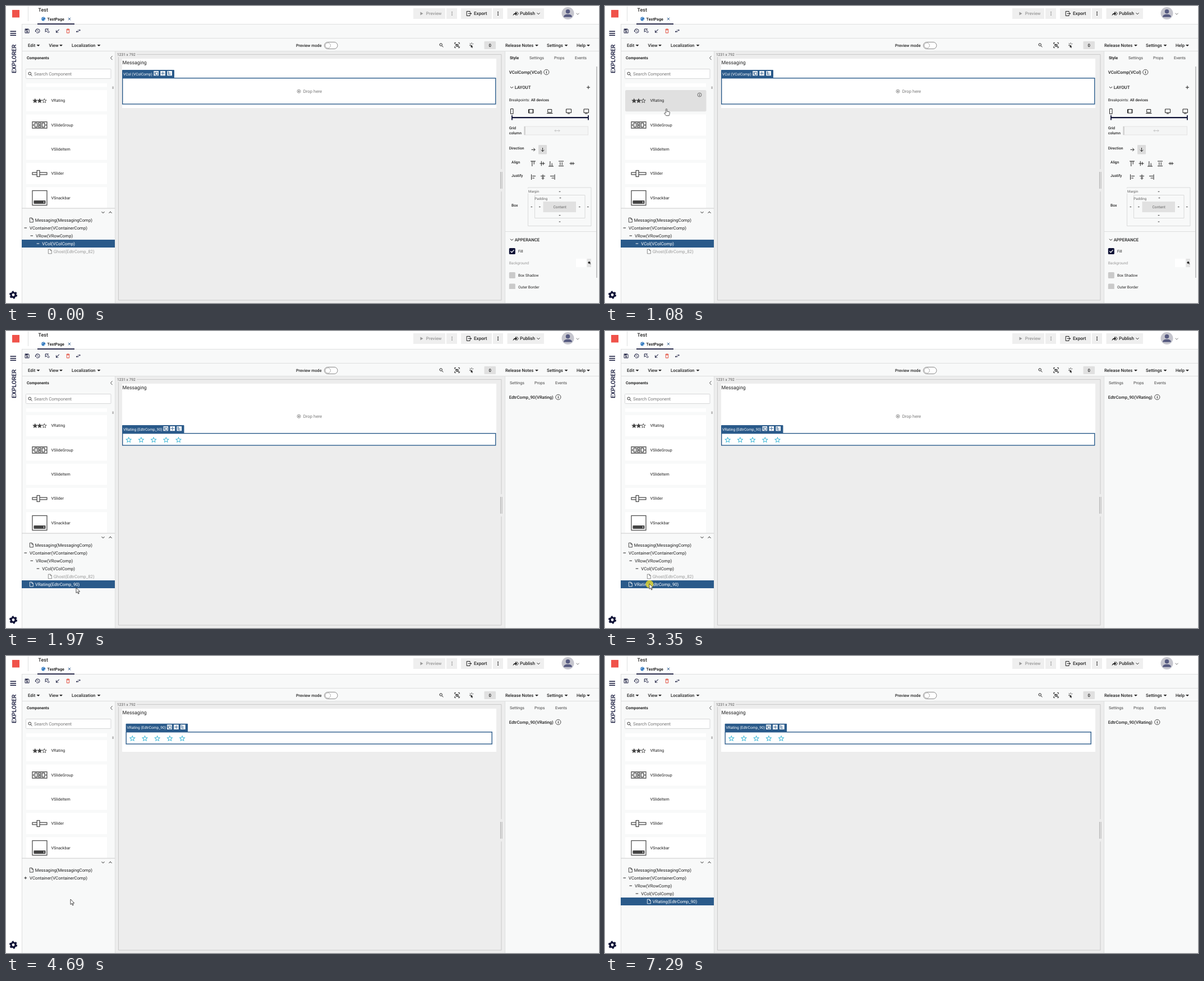
Write an HTML page that moves like this. It is 1057 px wide and 530 px high and loops after 7770 ms.

```html
<!DOCTYPE html>
<html lang="en">
<head>
<meta charset="utf-8">
<title>Page builder</title>
<style>
html, body { margin: 0; width: 100%; height: 100%; overflow: hidden; background: #fff; }
svg { display: block; width: 1057px; height: 530px; font: 7.79px Roboto, sans-serif; fill: #222; text-rendering: geometricPrecision; }
.m { font-weight: 500; }
.b { font-weight: 700; }
.s { font-size: 6.67px; }
.i { font-size: 7.1px; }
.l { fill: none; stroke: #222; }
.navy { fill: #0e1135; }
.sel { fill: #2a5a8a; }
.frame { fill: none; stroke: #2a5a8a; stroke-width: 1.4; }
.w { fill: #fff; }
.w .l { stroke: #fff; }
.btn { fill: #efefef; }
.dim { fill: #999; }
.dim .l { stroke: #aaa; }
.edge { stroke: #dedfdf; fill: none; }

.t { opacity: 0; animation: 7770ms step-end infinite; }
.before { animation-name: before; }
.after { animation-name: after; }
.loose { animation-name: loose; }
.empty { animation-name: empty; }
.nested { animation-name: nested; }
.shut { animation-name: shut; }
.open { animation-name: open; }
.rows { animation-name: rows; }
.card1 { animation-name: card1; }
.card2 { animation-name: card2; }
.over { animation-name: over; }
.press { animation-name: press; }
.arrow { animation-name: arrow; }
.hand { animation-name: hand; }
.dragged { animation-name: dragged; }
@keyframes before { 0% { opacity: 1 } 18.3% { opacity: 0 } }
@keyframes after { 18.3% { opacity: 1 } }
@keyframes loose { 18.3% { opacity: 1 } 60.3% { opacity: 0 } }
@keyframes empty { 0% { opacity: 1 } 60.3% { opacity: 0 } }
@keyframes nested { 60.3% { opacity: 1 } }
@keyframes shut { 60.3% { opacity: 1 } 63.3% { opacity: 0 } }
@keyframes open { 63.3% { opacity: 1 } }
@keyframes rows { 0% { opacity: 1 } 60.3% { opacity: 0 } 63.3% { opacity: 1 } }
@keyframes card1 { 13.85% { opacity: 1 } 20.9% { opacity: 0 } }
@keyframes card2 { 11.2% { opacity: 1 } 13.85% { opacity: 0 } }
@keyframes over { 23.8% { opacity: 1 } 24.4% { opacity: 0 } 48% { opacity: 1 } 59.4% { opacity: 0 } }
@keyframes press { 14.8% { opacity: .8 } 16.6% { opacity: 0 } 43.05% { opacity: .8 } 59.4% { opacity: 0 } }
@keyframes arrow { 0% { opacity: 1 } 11.2% { opacity: 0 } 22.6% { opacity: 1 } }
@keyframes hand { 11.2% { opacity: 1 } 22.6% { opacity: 0 } }
@keyframes dragged { 44% { opacity: .55 } 59.4% { opacity: 0 } }

.pointer { animation: pointer 7770ms ease-in-out infinite; }
@keyframes pointer {
  0%, 3.59% { transform: translate(1100px, 560px) }
  3.6% { transform: translate(899px, 512px) }
  13%, 16.6% { transform: translate(109.5px, 184px) }
  20% { transform: translate(103px, 209px); animation-timing-function: linear }
  23.8% { transform: translate(126px, 433px); animation-timing-function: ease-out }
  25.3% { transform: translate(125px, 458px) }
  33.5%, 34.5% { transform: translate(85px, 453px) }
  38.8%, 43.2% { transform: translate(79px, 451px) }
  50.9%, 69.1% { transform: translate(115px, 434px) }
  76.3%, 79.1% { transform: translate(317px, 441px) }
  82.3%, 84.9% { transform: translate(317px, 442px) }
  93.7% { transform: translate(1060px, 532px) }
  100% { transform: translate(1100px, 560px) }
}
.haul { animation: haul 7770ms ease-in-out infinite; }
@keyframes haul {
  0%, 43.2% { transform: none }
  50.9%, 100% { transform: translate(36px, -17px) }
}
</style>
</head>
<body>
<svg viewBox="0 0 1057 530">
<defs>
  <path id="caret" d="M-3-1.4h6l-3 3z"/>
  <path id="down" class="l" d="M-2.5-1.3 0 1.3l2.5-2.6"/>
  <path id="star" transform="translate(-12 -11.7)" d="M12 17.27 18.18 21l-1.64-7.03L22 9.24l-7.19-.62L12 2 9.19 8.62 2 9.24l5.45 4.73L5.82 21z"/>
  <path id="hollow" transform="translate(-12 -11.7)" fill-rule="evenodd" d="M12 15.39 8.24 17.66l.99-4.28-3.32-2.88 4.38-.37L12 6.09l1.71 4.04 4.38.37-3.32 2.88.99 4.28zM22 9.24l-7.19-.61L12 2 9.19 8.63 2 9.24l5.45 4.73L5.82 21 12 17.27 18.18 21l-1.64-7.03z"/>
  <path id="page" class="l" stroke-width=".8" d="M.4-3.9h3.8L6.4-1.7v5.6h-6zM4-3.9v2.4h2.4"/>
  <path id="dots" d="M-.8-3.4h1.6v1.6H-.8zM-.8-.8h1.6V.8H-.8zM-.8 1.8h1.6v1.6H-.8z"/>
  <g id="info"><circle class="l" r="4.6" stroke-width=".8"/><path d="M-.5-2.6h1v1h-1zM-.5-.9h1v3.5h-1z"/></g>
  <g id="tools">
    <path class="w" d="M-37 2.6h8.6v8.4H-37zM-25 2.6h8.6v8.4H-25zM-13 2.6h8.6v8.4H-13z"/>
    <path class="l" style="stroke:#2a5a8a" stroke-width=".9" d="M-35.4 4v4.5h1M-33.8 4.8h3.6v5h-3.6zM-24 6.8h6.6M-20.7 3.6v6.4M-11.7 4.2h2M-10.8 4.2v5h4M-10.8 6.6h4"/>
  </g>
  <g id="rating">
    <rect class="sel" x="207" y="168" width="110.5" height="14.5" rx="1"/>
    <text class="w s" x="209" y="177.6">VRating (EdtrComp_90)</text>
    <use href="#tools" x="317.5" y="167.3"/>
    <g fill="#2cb1d3">
      <use href="#hollow" transform="translate(218.7 194.2) scale(.556)"/>
      <use href="#hollow" transform="translate(240.9 194.2) scale(.556)"/>
      <use href="#hollow" transform="translate(263.1 194.2) scale(.556)"/>
      <use href="#hollow" transform="translate(285.3 194.2) scale(.556)"/>
      <use href="#hollow" transform="translate(307.5 194.2) scale(.556)"/>
    </g>
  </g>
  <g id="tabs" class="i" fill="#444"><text x="933" y="95">Settings</text><text x="977" y="95">Props</text><text x="1014" y="95">Events</text></g>
  <g id="row"><use href="#page" x="42" y="452"/><text x="52" y="454.5">VRating(EdtrComp_90)</text></g>
  <clipPath id="list"><path d="M28 138h166v222H28z"/></clipPath>
  <clipPath id="props"><path d="M890 80h167v425H890z"/></clipPath>
</defs>

<!-- surfaces -->
<path fill="#f8f9f9" d="M28 33h1029v497H28z"/>
<path fill="#ededed" d="M195 80h694v450H195z"/>
<path class="edge" d="M28 32.5h1029M28.5 33v497M28 57.5h1029M28 80.5h1029M194.5 80v450M889.5 80v450"/>

<!-- header -->
<rect x="11" y="7" width="13" height="13.5" fill="#f0524a"/>
<path class="edge" d="M39.5 1v26"/>
<text class="m" x="57.6" y="10.3" font-size="8.9">Test</text>
<path class="navy" d="M56 31.2h66v1.8H56z"/>
<circle cx="66.7" cy="23" r="3.5" fill="#2a74bd"/>
<path class="w" d="M64.2 22.2h1.2v1.2h-1.2zM65.4 20.4h1.2v1.2h-1.2zM67.4 20.4h1.2v1.2h-1.2zM67.6 24.2h2.4v1.2h-2.4z"/>
<text class="b i" x="73.6" y="25.6">TestPage</text>
<path class="l" style="stroke:#2a5a8a" d="m110.8 20.9 4.4 4.4m0-4.4-4.4 4.4"/>
<path class="btn" d="M726 4h57v19h-57zM785 4h19v19h-19zM811 4h55v19h-55zM868 4h18v19h-18zM893.500 4h65.500v19h-65.500z"/>
<g class="m">
  <g class="dim"><path d="m738.500 10.500 5 3-5 3z"/><text x="748.800" y="16.300">Preview</text><use href="#dots" x="795" y="13.500"/></g>
  <path class="l" d="M827 11.500V9.500h-5.800v8h5.800v-2M824 13.500h5.500m-2-2 2 2-2 2"/>
  <text x="834" y="16.300" font-size="8.100">Export</text><use href="#dots" x="877" y="13.500"/>
  <path d="M903.500 17.500q.5-4.500 4.500-5V9.800l3.200 3.700-3.200 3.700v-2.500q-3-.2-4.500 2.800z"/>
  <path class="l" d="m910.200 10 3.300 3.500-3.300 3.500"/>
  <text x="916" y="16.300" font-size="8.100">Publish</text><use href="#down" x="949" y="13.500"/>
</g>
<circle cx="1001.500" cy="13" r="11" fill="#c6c6ce"/>
<circle cx="1001.500" cy="9.700" r="3.800" fill="#565a80"/>
<path fill="#565a80" d="M994 19.800q0-5 7.500-5t7.500 5z"/>
<use href="#down" x="1019" y="14" opacity=".6"/>

<!-- side rail -->
<path class="navy" d="M7.500 44.500H18V46H7.500zM7.500 48H18v1.500H7.500zM7.500 51.500H18V53H7.500z"/>
<text class="m navy" font-size="10.600" transform="translate(17.500 120) rotate(-90)">EXPLORER</text>
<g fill="none" stroke="#0e1135" transform="translate(13 515.500)"><circle r="4" stroke-width="3.200"/><circle r="6" stroke-width="2.200" stroke-dasharray="3.140"/></g>

<!-- icon bar -->
<g class="navy">
  <path transform="translate(32.300 39.200) scale(.44)" d="M17 3H5a2 2 0 0 0-2 2v14a2 2 0 0 0 2 2h14a2 2 0 0 0 2-2V7zm2 16H5V5h11.170L19 7.830zm-7-7a3 3 0 0 0 0 6 3 3 0 0 0 0-6M6 6h9v4H6z"/>
  <path transform="translate(50.800 39.200) scale(.44)" d="M13.500 8H12v5l4.280 2.540.72-1.210-3.500-2.080zM13 3a9 9 0 0 0-9 9H1l3.960 4.030L9 12H6a7 7 0 1 1 2.060 4.940l-1.420 1.420A9 9 0 1 0 13 3"/>
  <path transform="translate(68.500 39.200) scale(.44)" fill="none" stroke="#0e1135" stroke-width="2.200" d="M4 4h12l-4 4 8 8-4 4-8-8-4 4z"/>
  <path transform="translate(86.800 39.200) scale(.44)" d="M19 6.410 17.590 5 7 15.590V9H5v10h10v-2H8.410z"/>
  <path transform="translate(105.200 39.200) scale(.44)" fill="#e0402f" d="M6 19a2 2 0 0 0 2 2h8a2 2 0 0 0 2-2V7H6zM8 9h8v10H8zm7.500-5-1-1h-5l-1 1H5v2h14V4z"/>
  <path transform="translate(123.500 39.200) scale(.44)" d="m21 9-4-4v3h-7v2h7v3M7 11l-4 4 4 4v-3h7v-2H7z"/>
</g>

<!-- menu bar -->
<g class="m">
  <text x="39" y="72.800">Edit</text><use href="#caret" x="57.500" y="70.500"/>
  <text x="76.500" y="72.800">View</text><use href="#caret" x="98" y="70.500"/>
  <text x="117" y="72.800">Localization</text><use href="#caret" x="165.500" y="70.500"/>
  <text x="517" y="72.700" font-size="7.200">Preview mode</text>
  <text x="890" y="72.800">Release Notes</text><use href="#caret" x="946" y="70.500"/>
  <text x="964" y="72.800">Settings</text><use href="#caret" x="998.500" y="70.500"/>
  <text x="1017" y="72.800">Help</text><use href="#caret" x="1038" y="70.500"/>
  <rect x="852.500" y="63" width="20.500" height="14" rx="1" fill="#e0e0e0"/><text x="860.500" y="73">0</text>
</g>
<rect x="567.500" y="64.500" width="23.500" height="12" rx="6" fill="#fff" stroke="#888"/>
<circle cx="573.800" cy="70.500" r="4.700" fill="#fff" stroke="#999" stroke-width=".8"/>
<g class="l"><circle cx="775.200" cy="69" r="2.200"/><path d="m777 71 2.400 2.400M799.800 68v-2.500h2M806.200 65.500h2V68M808.200 72v2.500h-2M801.800 74.500h-2V72M802 68.500h4v3.500h-4zM801 67.500l6 5.500M826 70h2M827 66.500l1.300 1.600M830 65.500v2M833 67l-1.400 1.400"/></g>
<path d="m828.500 69 4 3.200-1.700.2 1 2-1.200.5-.9-2-1.200 1z"/>

<!-- component list -->
<text class="b" x="37" y="95" font-size="6.950">Components</text>
<path class="l" stroke-width=".8" d="m189.500 89.300-3 3.400 3 3.400"/>
<rect x="35.500" y="112.500" width="151.500" height="17" rx="1" fill="#fff" stroke="#d6d7d8"/>
<circle class="l" cx="42.300" cy="120.500" r="2.400" stroke-width=".9"/><path class="l" d="m44.200 122.500 2.300 2.300"/>
<text x="50" y="124.200" font-size="7.900" fill="#777">Search Component</text>
<g clip-path="url(#list)">
  <path class="w" d="M36 138h144v6.500H36zM36 150h144v38H36zM36 193.500h144v38H36zM36 236.800h144v38H36zM36 280h144v38H36zM36 323.300h144v38H36z"/>
  <g class="t card1"><rect x="36" y="150" width="144.500" height="38.300" rx="2" fill="#e0e0e0"/><use href="#info" transform="translate(168.500 158.500) scale(.75)"/></g>
  <rect class="t card2" x="36" y="193.500" width="144.500" height="38.300" rx="2" fill="#e0e0e0"/>
  <g fill="#444">
    <use href="#star" transform="translate(51.800 169) scale(.46)"/>
    <use href="#star" transform="translate(60 169) scale(.46)"/>
    <use href="#hollow" transform="translate(68.300 169) scale(.46)"/>
    <path fill="none" stroke="#444" stroke-width="1.200" d="M47 206.600h26v11.600H47zM51.500 208.700h4v7.400h-4zM57.800 208.700h4.400v7.400h-4.400zM64.500 208.700h4v7.400h-4zM49.800 211l-1.300 1.400 1.300 1.400M70.200 211l1.300 1.400-1.300 1.400M59 211l2 3m0-3-2 3M47 297.200h26v3.600H47z"/>
    <rect x="55.200" y="293.500" width="4.800" height="11" fill="#fff" stroke="#444" stroke-width="1.200"/>
    <rect x="47" y="329.500" width="26" height="26" fill="none" stroke="#444" stroke-width="1.200"/>
    <rect x="49.500" y="347" width="21" height="6" rx="1"/><path class="w" d="M67 348.500h1v3h-1z"/>
  </g>
  <g class="i">
    <text x="80.600" y="171.300">VRating</text>
    <text x="80.600" y="214.600">VSlideGroup</text>
    <text x="80.600" y="257.900">VSlideItem</text>
    <text x="80.600" y="301.200">VSlider</text>
    <text x="80.600" y="344.500">VSnackbar</text>
  </g>
</g>
<rect x="189.300" y="143.500" width="2.700" height="4.500" fill="#bbb"/>

<!-- tree -->
<path stroke="#ccc" d="M28 361h166"/>
<use href="#down" x="173" y="368.300"/><use href="#down" transform="translate(186 368.300) scale(1 -1)"/>
<rect class="t over" x="28.500" y="431" width="166" height="14" fill="#e9edf0"/>
<use href="#page" x="42" y="382"/><text x="51.700" y="384.800">Messaging(MessagingComp)</text>
<path class="l" d="M32.500 396h4.600"/><path class="l t shut" d="M34.800 393.700v4.600"/>
<text x="42" y="398.800">VContainer(VContainerComp)</text>
<g class="t rows">
  <path class="l" d="M43.500 410h4.600M54.700 424h4.600"/>
  <text x="53" y="412.700">VRow(VRowComp)</text><text x="64.300" y="426.600">VCol(VColComp)</text>
</g>
<g class="t empty dim"><use href="#page" x="75" y="438" opacity=".6"/><text x="84.800" y="440.500">Ghost(EdtrComp_82)</text></g>
<g class="t before">
  <path class="sel" d="M28 417h166v14H28z"/>
  <g class="w"><path d="M54.700 423.500h4.600v1h-4.600z"/><text x="64.300" y="426.600">VCol(VColComp)</text></g>
</g>
<g class="t loose">
  <path class="sel" d="M28 445h166v14H28z"/>
  <g class="w"><path fill="none" stroke="#fff" stroke-width=".8" d="M42.400 448.100h3.800l2.200 2.200v5.600h-6zM46 448.100v2.400h2.400"/><text x="52" y="454.500">VRating(EdtrComp_90)</text></g>
</g>
<g class="t open">
  <path class="sel" d="M28 431h166v14H28z"/>
  <path fill="none" stroke="#fff" stroke-width=".8" d="M75.400 434.100h3.800l2.200 2.200v5.600h-6zM79 434.100v2.400h2.400"/>
  <text class="w" x="84.800" y="440.500">VRating(EdtrComp_90)</text>
</g>

<!-- canvas -->
<path fill="none" stroke="#c9c9c9" d="M233 86.500h650v438.500H200.500V91"/>
<text class="s" x="198" y="88.800" fill="#555">1231 x 792</text>
<path class="w" d="M207 94h667v77H207z"/>
<path class="w t before" d="M207 94h667v88H207z"/>
<path class="w t loose" d="M207 94h667v111H207z"/>
<text x="207.500" y="103.800" font-size="8.850">Messaging</text>
<g class="t empty" fill="#777"><circle cx="522" cy="152.200" r="3" fill="none" stroke="#777" stroke-width=".8"/><circle cx="522" cy="152.200" r="1.200"/><text x="529.700" y="155">Drop here</text></g>
<g class="t before">
  <rect class="sel" x="207" y="114" width="93" height="14.500" rx="1"/>
  <text class="w s" x="209" y="123.800">VCol (VColComp)</text><use href="#tools" x="300.300" y="113.300"/>
  <rect class="frame" x="207.700" y="128.700" width="665" height="46.300"/>
</g>
<g class="t loose"><use href="#rating"/><rect class="frame" x="207.700" y="182.700" width="665" height="21.300"/></g>
<g class="t nested"><use href="#rating" x="6.600" y="-47.300"/><rect class="frame" x="214.200" y="135.700" width="652" height="21.300"/></g>
<path fill="#ededed" d="M880 291h6v40h-6z"/><path stroke="#aaa" d="M881.500 296v30M884 296v30"/>

<!-- property panel -->
<g class="t after">
  <use href="#tabs" x="-35"/>
  <text class="m" x="896.700" y="120.700" font-size="7.700">EdtrComp_90(VRating)</text><use href="#info" x="984.300" y="118"/>
</g>
<g class="t before" clip-path="url(#props)">
  <text class="b i" x="898" y="95">Style</text><use href="#tabs"/>
  <path fill="#c4c5c6" d="M1052 108h2v377h-2z"/>
  <text class="m" x="896.700" y="120.700">VColComp(VCol)</text><use href="#info" x="963.300" y="118"/>
  <use href="#down" x="901.500" y="145.300"/><text class="m" x="906.700" y="148">LAYOUT</text>
  <path class="l" d="M1035 145.200h6M1038 142.200v6"/>
  <g class="s"><text x="896.700" y="169.500">Breakpoints:</text><text class="m" x="935.700" y="169.500">All devices</text></g>
  <path class="l" d="M899.500 183.500h4.500v9h-4.500zM931.500 184.500h8.500v6.500h-8.500zM932.500 184.500v6.500M939 184.500v6.500M965.700 184.500h7v5.500h-7zM964 191.500h10.500M998.500 184h9v6.500h-9zM1001 192h4M1030 184h8.500v6.500H1030zM1032 192h4.500"/>
  <path class="navy" d="M901 195h1.800v3h134.200v-3h1.800v8.500H1037v-3.200H902.800v3.200H901z"/>
  <g class="m s">
    <text x="896.700" y="220.300">Grid</text><text x="896.700" y="228.500">column</text>
    <text x="896.700" y="256.300">Direction</text><text x="901" y="280.500">Align</text><text x="901" y="304.700">Justify</text><text x="901" y="358">Box</text>
  </g>
  <rect x="924" y="215" width="113.500" height="15" fill="#f4f5f5" stroke="#e3e3e3"/><path fill="#cfcfcf" d="M923.500 215h2.300v15h-2.300z"/>
  <path fill="none" stroke="#c3c3c3" d="M978 222.500h9M980 220.500l-2 2 2 2M985 220.500l2 2-2 2"/>
  <rect x="949" y="248" width="15" height="16.500" rx="1" fill="#dcdcdc"/>
  <path class="l" d="M936.500 256.300h6.500M940.300 253.500l2.800 2.800-2.800 2.800M956.500 253v6.500M953.700 256.800l2.800 2.800 2.800-2.800"/>
  <path class="l" d="M935 277h9M937.800 277v9M941.200 277v5.500M951.500 281h9M954.300 276.800v8.500M957.700 278.300v5.400M967 286h9M969.800 277v9M973.200 280.500v5.500M985 277h9M985 285.500h9M987.800 279v5M991.200 279v5M1004.500 281h9M1007.300 278.500v5M1010.700 278.500v5"/>
  <path class="l" d="M936.500 300.500v9.500M938 303.500h6M938 307h4M957 300.500v9.500M953 303.500h8M954.500 307h5M978 300.500v9.500M970 303.500h7M972.500 307h4.500"/>
  <g fill="none" stroke="#d9dada"><path d="M930.500 324h112.500v68.500H930.500z"/><path d="M942.500 337.500h89.500v41h-89.500z"/></g>
  <path fill="#f8f9f9" d="M930 325.500h22v9h-22z"/>
  <path fill="#e1e1e1" d="M957.500 349h58.500v19h-58.500z"/>
  <g fill="#666"><text x="931" y="332.600" font-size="6.200">Margin</text><text x="942.300" y="346" font-size="6.300">Padding</text><text class="s" x="975.500" y="361">Content</text></g>
  <path class="l" d="M985.700 331.200h2.600M986.700 342.500h2.600M935.500 358.500h2.600M950 358.500h2.600M1021 358.500h2.600M1036 358.500h2.600M985.700 373.500h2.600M985.700 385h2.600" stroke-width=".9"/>
  <path class="edge" d="M890 402.500h162"/>
  <use href="#down" x="901.500" y="417"/><text class="m" x="906.700" y="419.500">APPERANCE</text>
  <rect class="navy" x="896.800" y="432" width="11" height="11" rx="1.500"/><path fill="none" stroke="#fff" stroke-width="1.300" d="m899.300 437.500 2.200 2.200 4-4.300"/>
  <rect x="896.800" y="475" width="11" height="11" rx="1.500" fill="#cacaca"/><rect x="896.800" y="495.500" width="11" height="11" rx="1.500" fill="#cacaca"/>
  <path class="w" d="M1016 451h18.500v15H1016z"/><path fill="#e3e3e3" d="M1035.500 451h7.500v15h-7.500z"/><path d="m1037 458 2.500-2.500 2.500 2.500-2.500 2.300zM1041.500 459l1 1.500h-2z"/>
  <g class="s"><text x="913" y="440">Fill</text><text class="dim" x="896.700" y="460.500">Background</text><text x="913" y="482.800">Box Shadow</text><text x="913" y="503.500">Outer Border</text></g>
</g>

<!-- pointer -->
<g class="haul"><g class="t dragged"><path class="sel" d="M28 445h166v14H28z"/><g class="w"><text x="52" y="454.500">VRating(EdtrComp_90)</text></g></g></g>
<g class="pointer">
  <circle class="t press" r="7" cx=".3" cy=".8" fill="#e3d72c"/>
  <path class="t arrow" fill="#fff" stroke="#222" stroke-width=".8" d="M0 0v9.500l2.200-2 1.500 3.500 1.500-.6L3.700 7h3z"/>
  <path class="t hand" fill="#fff" stroke="#222" stroke-width=".8" d="M-1 7V.5a1 1 0 0 1 2 0V4l4 .8q1 .3.900 1.300l-.5 3-.7 2.600H-.5L-3.500 8q-.6-1.200.8-1.200z"/>
</g>
</svg>
</body>
</html>
```
